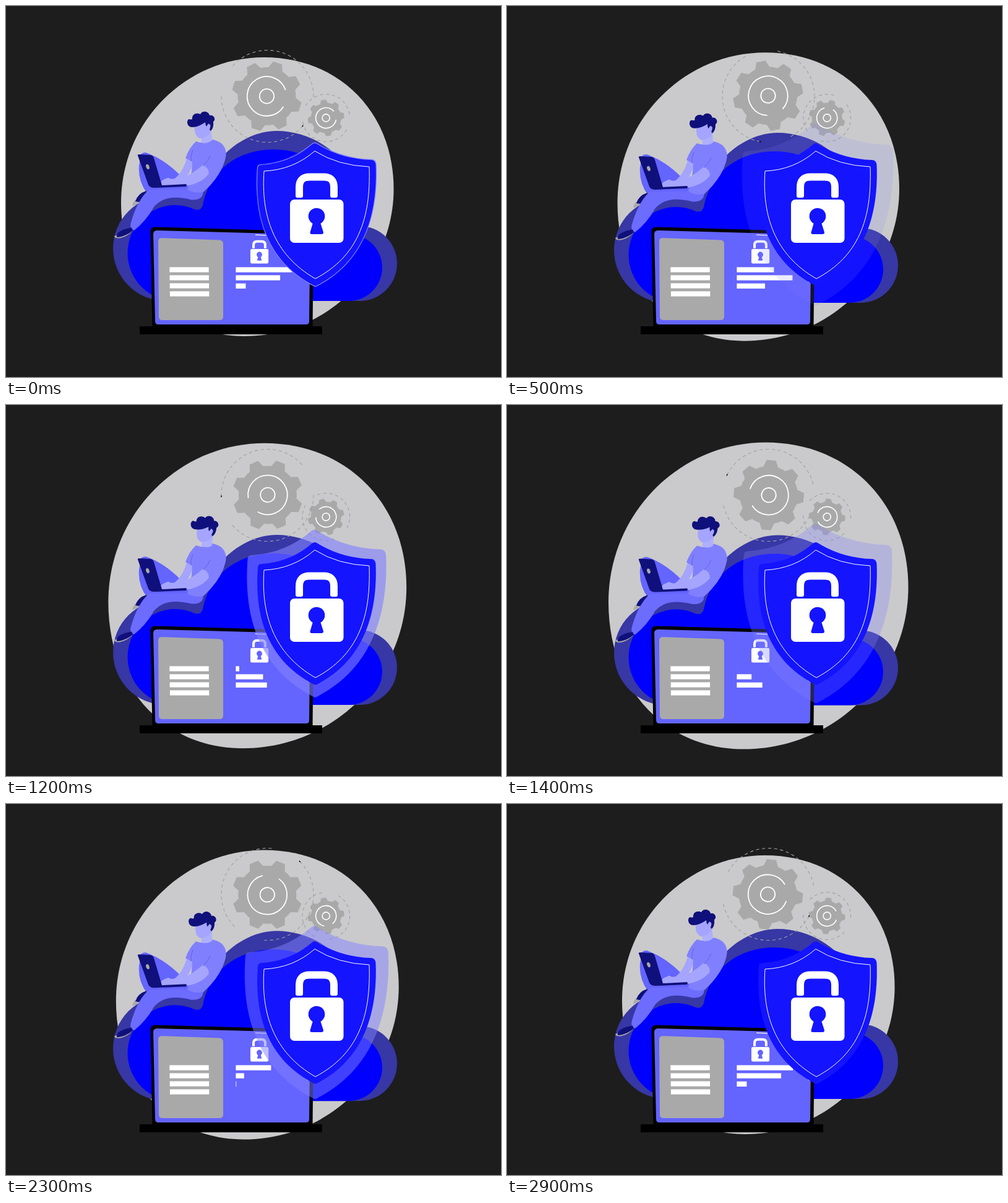
An HTML page for the animation above (3000 ms loop, 800 by 600 pixels).

```html
<!DOCTYPE html>
<html lang="en">
<head>
<meta charset="utf-8">
<title>Cloud security</title>
<style>
  html, body { margin: 0; width: 100%; height: 100%; overflow: hidden; background: #1d1d1d; }
  svg { display: block; width: 100vw; height: 100vh; }
  .line { fill: none; stroke: #fff; }
  .navy { fill: #10107c; }
  .skin { fill: #a5a5ff; }
  .dash { fill: none; stroke: #a0a0a0; stroke-width: 1.1; stroke-dasharray: 5.2 4.6; }
</style>
</head>
<body>
<svg viewBox="0 0 800 600">
  <defs>
    <path id="shieldShape" d="M495 223.500Q499 220.500 503 223.500Q542 247.500 590 249Q597 249.500 597.500 257C601 345 574 415 503 451.500Q500 453.500 497 451.500C425 414 401 345 407 263Q407 257 413 257Q460 254 495 223.500Z"/>
    <g id="padlock">
      <path d="M474 304V293Q474 276.500 490.500 276.500H513.500Q530 276.500 530 293V304" fill="none" stroke="#fff" stroke-width="12" stroke-linejoin="round"/>
      <path d="M468 303H480V307Q480 310 477 310H471Q468 310 468 307ZM524 303H536V307Q536 310 533 310H527Q524 310 524 307Z" fill="#fff"/>
      <rect x="459" y="313" width="86.500" height="70" rx="7" fill="#fff"/>
      <circle cx="502" cy="340" r="13.300"/>
      <path d="M497 347H507L513 366Q513 369 510 369H494Q491 369 491.500 366Z"/>
    </g>
  </defs>

  <path id="blob" fill="#cacacc" d="M417 83C539 83 626.500 173 626.500 296C626.500 427 518 534 385 534C268 534 186 444 186 318C186 188 290 83 417 83Z"/>

  <g id="cloud">
    <g fill="#3737a5">
      <circle cx="258" cy="392" r="85"/>
      <path d="M258 307Q292 308 310 300L355 238C378 216 408 202 437 202C475 202 510 218 534 241L570 360V477H258Z"/>
      <circle cx="571.500" cy="416.500" r="60.500"/>
    </g>
    <path fill="#00f" d="M273.500 477A77 77.500 0 0 1 273.500 322Q290 322 305 329Q315 332 318 322C330 262 378 232 433 232C486 232 525 262 545 310L554 369A54 54 0 0 1 554 477Z"/>

    <path fill="#6464ff" d="M218 240Q222 235 230 238.500Q257 249 282 274L300 296L240 303H228Q213 283 215 258Z"/>
    <path fill="#aaa" d="M204 323Q206 314 212 312L217 316Q210 323 204 323Z"/>
    <path class="navy" d="M209 316Q213 303 227 299L229 304Q221 314 215 317Z"/>
    <path fill="#6c6cff" d="M231 297L318 296Q322 314 300 313.500C270 306 252 310 239 325Q227 347 207 363Q199 360 202 350Q212 314 231 297Z"/>
    <path fill="#aaa" d="M175 372Q176 377 186 375Q197 372 204 364L200 363Z"/>
    <path class="navy" d="M179 371Q181 362 203 358.500L205 363Q195 372 181 374Q178 374 179 371Z"/>
    <path class="skin" d="M292 247L302 251Q301 267 285 285L258 287Q256 282 262 278Q271 282 275 277Q286 267 292 247Z"/>
    <path fill="#8080ff" d="M307 219Q324 225 334 216Q357 221 355.500 242Q352 265 331 289L319 301Q302 304 293 296Q300 280 301 252L290 246Q296 229 307 219Z"/>
    <path class="skin" d="M318 257Q329 262 327.500 272Q315 287 291 291L251 290Q248 285 254 281L262 277.500Q269 283 280 280Q302 272 318 257Z"/>
    <path d="M302 233Q298 242 299 251M330 242Q327 251 318 259" fill="none" stroke="#5c5cd8" stroke-width=".8"/>
    <path class="navy" d="M213 242Q212 240 216 240L234 241Q238 242 239 246L252 290L291 288Q293 290 291 292L240 294Q232 294 230 289Z"/>
    <ellipse cx="229" cy="260" rx="2.600" ry="4.200" fill="#aaa" transform="rotate(-18 229 260)"/>

    <g id="head">
      <path fill="#afafff" d="M317 206L331 200L333 217Q325 224 315.500 220Z"/>
      <path class="skin" d="M305 193Q303 210 314 214.500Q325 213 331 203L333 191L321 184Z"/>
      <path class="navy" d="M301 196C292 196 291 184 296 183Q299 184 301 183C300 174 309 172 314 175C317 168 328 170 329 177C336 175 340 184 335 187Q336 197 331 202L329 200Q331 192 327 190L324 195Q322 192 322 188Q311 196 301 196Z"/>
      <ellipse class="skin" cx="327.500" cy="196" rx="2.500" ry="5" transform="rotate(15 327 196)"/>
    </g>
  </g>

  <g id="gears"></g>

  <path d="M233.500 365Q233.500 357.500 241 357.500L489 364.500Q497 365.500 497 374L495.500 519H236.500Z"/>
  <path fill="#6464ff" d="M238 369Q238 363 244 363L486 369.500Q491.500 370 491.500 376L490 510Q490 515 485 515H246Q241 515 241 509Z"/>
  <rect x="216" y="518" width="295" height="13"/>
  <path class="line" d="M403 370.200L421 370.800M486.500 446.500H488.500" stroke-width="1.200"/>
  <path fill="#a9a9a9" d="M246 381Q246 375 252 375.200L345 378.500Q351 379 351 385V502Q351 508 345 508H253Q247 508 247 502Z"/>
  <g id="panelBars" fill="#fff"></g>
  <g id="typedBars" fill="#fff"></g>
  <use href="#padlock" fill="#6464ff" transform="translate(395 393) scale(.337) translate(-459 -313)"/>

  <use id="pulse" href="#shieldShape" fill="#8080ff"/>
  <use href="#shieldShape" fill="#1414ff"/>
  <path class="line" d="M499 234.500Q536 258 587 260C590 345 568 405 500 441C432 402 412 338 417 267Q464 265 499 234.500Z"/>
  <use href="#padlock" fill="#1414ff"/>
</svg>

<script>
  const TAU = Math.PI * 2;
  const LOOP = 3000, TICK = 100, STEPS = 28, SWAY = 27;
  const $ = id => document.getElementById(id);

  function add(parent, tag, attrs) {
    const node = document.createElementNS("http://www.w3.org/2000/svg", tag);
    for (const key in attrs) node.setAttribute(key, attrs[key]);
    return parent.appendChild(node);
  }

  function polar(radius, degrees) {
    const a = degrees * TAU / 360;
    return (radius * Math.cos(a)).toFixed(2) + " " + (radius * Math.sin(a)).toFixed(2);
  }

  function arc(radius, from, to) {
    const large = to - from > 180 ? 1 : 0;
    return `M${polar(radius, from)}A${radius} ${radius} 0 ${large} 1 ${polar(radius, to)}`;
  }

  // Eight trapezoid teeth on a round body
  function gearPath() {
    let d = "";
    for (let a = 0; a < 360; a += 45) {
      d += (a ? "A47 47 0 0 1 " : "M") + polar(47, a - 14.5);
      d += `L${polar(57, a - 7.5)}L${polar(57, a + 7.5)}L${polar(47, a + 14.5)}`;
    }
    return d + `A47 47 0 0 1 ${polar(47, -14.5)}Z`;
  }

  function makeGear(scale, toothAngle, gapAngle, lineWidth) {
    const spin = add($("gears"), "g", {});
    const body = add(spin, "g", { transform: `scale(${scale})` });
    add(body, "path", { d: gearPath(), fill: "#a9a9a9", transform: `rotate(${toothAngle})` });
    const stroke = { class: "line", "stroke-width": lineWidth / scale };
    add(body, "circle", { r: 11.7, ...stroke });
    add(body, "path", { d: arc(31.8, gapAngle + 25, gapAngle + 335), ...stroke });
    return spin;
  }

  function makeOrbit(radius, start) {
    const spin = add($("gears"), "g", {});
    for (const from of [start, start + 181])
      add(spin, "path", { class: "dash", d: arc(radius, from, from + 141) });
    return spin;
  }

  const bigGear = makeGear(1, 18, 7, 1.8);
  const smallGear = makeGear(.52, 37, -15, 1.6);
  const bigOrbit = makeOrbit(74.5, 40);
  add(bigOrbit, "path", { d: arc(74.5, 39, 41.2), fill: "none", stroke: "#000", "stroke-width": 1.4 });
  const smallOrbit = makeOrbit(38.3, 30);

  for (let row = 0; row < 4; row++)
    add($("panelBars"), "rect", { x: 264.3 + row * .2, y: 422.4 + row * 13, width: 63.4, height: 8.2 });

  const typed = [
    { y: 422.4, width: 91, lag: 0 },
    { y: 435.4, width: 91, lag: 59.5 },
    { y: 448.7, width: 54.5, lag: 119 }
  ].map(bar => ({
    ...bar,
    node: add($("typedBars"), "rect", { x: 371.4, y: bar.y, height: 8.3 })
  }));

  function place(node, x, y, angle) {
    node.setAttribute("transform", `translate(${x} ${y}) rotate(${angle})`);
  }

  function draw(time) {
    // The picture holds for one extra tick twice per loop
    const tick = Math.floor(time % LOOP / TICK);
    const step = tick - (tick > 10) - (tick > 20);

    const sway = TAU * (step + .35) / SWAY;
    const breath = (1 - Math.cos(sway)) / 2;
    $("blob").setAttribute("transform",
      `translate(406 308.4) scale(${1 + .1 * breath}) translate(-406 -308.4)`);
    $("cloud").setAttribute("transform", `translate(0 ${8.6 * breath})`);
    $("head").setAttribute("transform", `rotate(${11 * breath} 320 218)`);

    for (const bar of typed) {
      const level = (1 + Math.cos(sway - bar.lag * TAU / 360)) / 2;
      bar.node.setAttribute("width", bar.width * level);
    }

    const turn = TAU * step / STEPS;
    const angle = 360 * step / STEPS;
    const bigAngle = angle - 4.5 * Math.sin(turn);
    place(bigGear, 422.3 - .8 * Math.cos(turn), 145.9 - .8 * Math.sin(turn), bigAngle);
    place(bigOrbit, 422.5, 146, bigAngle);
    place(smallGear, 517.2, 181, -angle);
    place(smallOrbit, 517.3, 181, -angle);

    const beat = STEPS / 3;
    const rest = 1 - Math.min(1, (step % beat + .1) / 8.3);
    const grow = 1 + .283 * (1 - rest ** 4);
    $("pulse").setAttribute("transform",
      `translate(502 337.5) scale(${grow}) translate(-502 -337.5)`);
    $("pulse").setAttribute("opacity", rest * rest);
  }

  const start = performance.now();
  function loop() {
    draw(performance.now() - start);
    requestAnimationFrame(loop);
  }
  loop();
</script>
</body>
</html>
```
